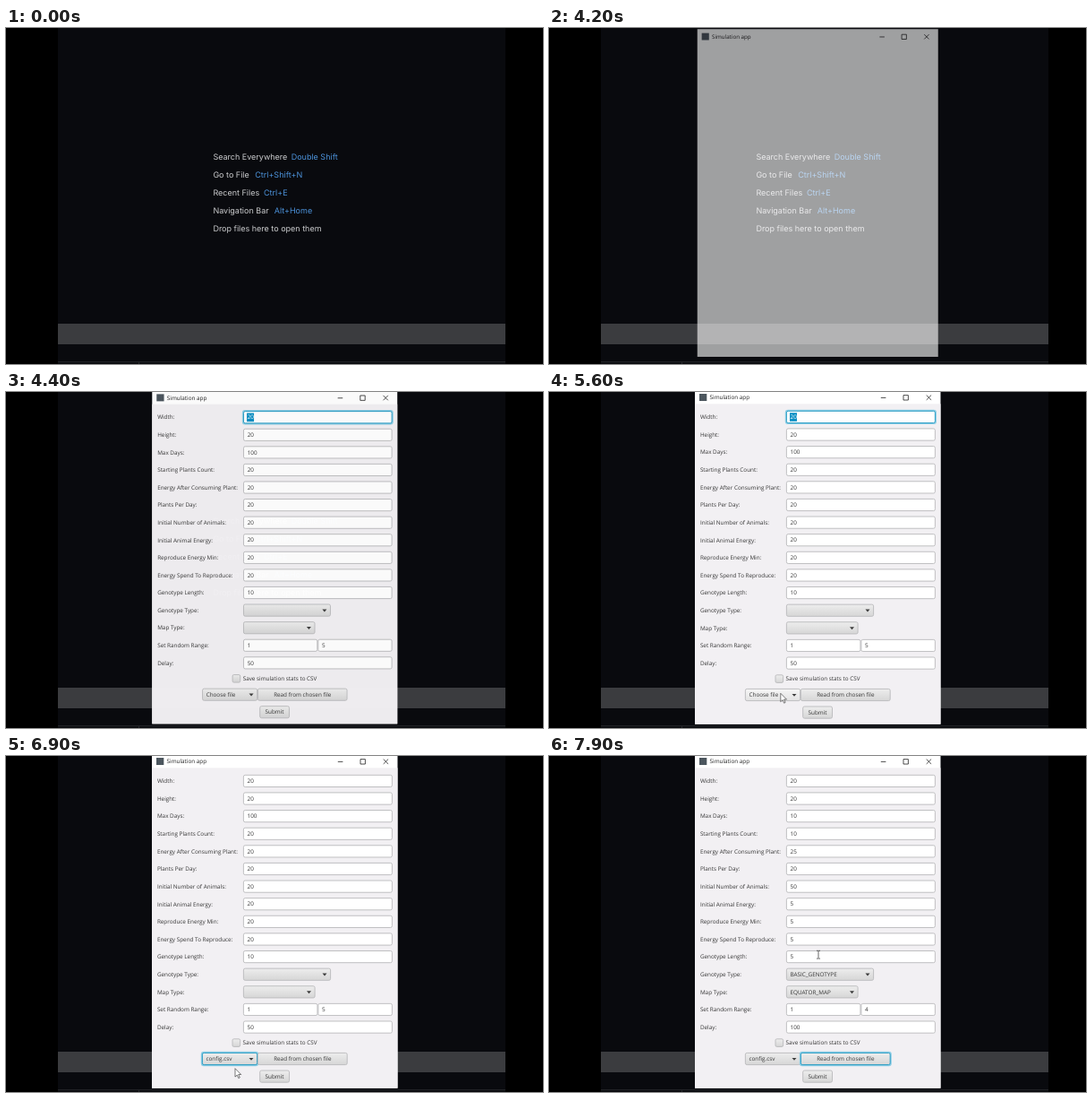
An HTML page that plays this animation: 600 px wide and 375 px high, repeating every 8 s.

```html
<!DOCTYPE html>
<html lang="en">
<head>
<meta charset="utf-8">
<title>Simulation app</title>
<style>
  html, body { margin: 0; width: 100%; height: 100%; overflow: hidden; background: #000; }
  svg { display: block; width: 100vw; height: 100vh; }
  text { text-rendering: geometricPrecision; white-space: pre; }
  .ide { font: 9px Inter, Roboto, sans-serif; fill: #cbccce; }
  .ide .key { fill: #4c92da; }
  .app { font: 6.35px "Open Sans", "Noto Sans", sans-serif; fill: #363636; }
</style>
</head>
<body>
<svg id="stage" viewBox="0 0 600 375" xmlns="http://www.w3.org/2000/svg">
  <defs>
    <linearGradient id="button" x2="0" y2="1">
      <stop offset="0" stop-color="#ededed"/>
      <stop offset="1" stop-color="#d6d6d6"/>
    </linearGradient>
    <linearGradient id="hover" x2="0" y2="1">
      <stop offset="0" stop-color="#f6f6f6"/>
      <stop offset="1" stop-color="#e2e2e2"/>
    </linearGradient>
  </defs>
  <rect width="600" height="375"/>
  <g id="desktop"></g>
  <g id="app"></g>
  <g id="pointer"></g>
</svg>
<script>
const LOOP = 8000, STEP = 100;
const OPEN = 4200, FORM = 4300, POINTER = 5100, COMBO_FOCUS = 6100, POPUP = 6200,
      PICK = 6800, READ_FOCUS = 7400, LOADED = 7600;

const labels = ['Width', 'Height', 'Max Days', 'Starting Plants Count', 'Energy After Consuming Plant',
  'Plants Per Day', 'Initial Number of Animals', 'Initial Animal Energy', 'Reproduce Energy Min',
  'Energy Spend To Reproduce', 'Genotype Length', 'Genotype Type', 'Map Type', 'Set Random Range', 'Delay'];
const defaults = [20, 20, 100, 20, 20, 20, 20, 20, 20, 20, 10, '', '', [1, 5], 50];
const loaded = [20, 20, 10, 10, 25, 20, 50, 5, 5, 5, 5, 'BASIC_GENOTYPE', 'EQUATOR_MAP', [1, 4], 100];

const byId = id => document.getElementById(id);
const rowY = i => 27.9 + 19.62 * i;
const lerp = (a, b, p) => a + (b - a) * p;
const progress = (t, from, to) => Math.min(1, Math.max(0, (t - from) / (to - from)));
const easeOut = p => 1 - (1 - p) ** 2;

const rect = (x, y, w, h, fill, extra = '') =>
  `<rect x="${x}" y="${y}" width="${w}" height="${h}" fill="${fill}" ${extra}/>`;
const text = (x, y, s, extra = '') => `<text x="${x}" y="${y}" ${extra}>${s}</text>`;
const path = (d, extra) => `<path d="${d}" ${extra}/>`;

// Rounded control centred vertically on cy
function box(x, cy, w, fill, focused) {
  const h = 14, y = cy - h / 2;
  const glow = focused
    ? rect(x - .4, y - .4, w + .8, h + .8, 'none', 'rx="2.2" stroke="#8fcfe6" stroke-width="1.6"') : '';
  const line = focused ? '#1795c0' : '#b9b9bb';
  return glow + rect(x + .4, y + .4, w - .8, h - .8, fill, `rx="1.8" stroke="${line}" stroke-width=".9"`);
}

function field(x, cy, w, value, focused) {
  const selection = focused ? rect(269, cy - 4.7, 8, 9.6, '#0a8fc4') : '';
  return box(x, cy, w, '#fff', focused) + selection +
    text(x + 4.6, cy + 2.2, value, focused ? 'fill="#fff"' : '');
}

function combo(x, cy, w, value, focused, hovered) {
  const ax = x + w - 9.5;
  return box(x, cy, w, hovered ? 'url(#hover)' : 'url(#button)', focused) +
    text(x + 4.5, cy + 2.2, value) +
    path(`M${ax} ${cy - 1.1}h5l-2.5 2.9z`, 'fill="#3c3c3c"');
}

function button(x, cy, w, label, focused, hovered) {
  return box(x, cy, w, hovered ? 'url(#hover)' : 'url(#button)', focused) +
    text(x + w / 2, cy + 2.2, label, 'text-anchor="middle"');
}

function desktop() {
  const hints = [
    ['Search Everywhere', 318.7, 'Double Shift'],
    ['Go to File', 278.2, 'Ctrl+Shift+N'],
    ['Recent Files', 288, 'Ctrl+E'],
    ['Navigation Bar', 299.7, 'Alt+Home'],
    ['Drop files here to open them', 0, '']
  ];
  return rect(58, 0, 500, 375, '#090a0e') +
    rect(58, 330, 500, 23, '#3b3c3f') +
    rect(58, 372.3, 500, .9, '#2b2d31') +
    rect(148, 373, .8, 2, '#2b2d31') +
    '<g class="ide">' + hints.map(([name, x, key], i) => {
      const y = 146.6 + 20.2 * i;
      return text(231.4, y, name) + text(x, y, key, 'class="key"');
    }).join('') + '</g>';
}

function titleBar() {
  const stroke = 'fill="none" stroke="#222" stroke-width=".8"';
  return rect(168, 2, 8.3, 8, '#4c565e') +
    text(179.6, 8.4, 'Simulation app', 'fill="#222"') +
    path('M370.8 6.4h5.6M396 3.6h5.4v5.4h-5.4zM421.7 3.5l5.4 5.4M427.1 3.5l-5.4 5.4', stroke);
}

function form(t, pos) {
  const values = t >= LOADED ? loaded : defaults;
  const over = (x, w) => pos && pos.y > 331 && pos.y < 345 && pos.x > x && pos.x < x + w;
  const rows = labels.map((label, i) => {
    const y = rowY(i), v = values[i];
    let control;
    if (i === 11) control = combo(265, y, 98, v);
    else if (i === 12) control = combo(265, y, 80.5, v);
    else if (i === 13) control = field(265, y, 83.3, v[0]) + field(348.5, y, 83.3, v[1]);
    else control = field(265, y, 166.8, v, i === 0 && t < COMBO_FOCUS);
    return text(168.9, y + 2.3, label + ':') + control;
  }).join('');
  const chosen = t >= PICK ? 'config.csv' : 'Choose file';
  const comboFocus = t >= COMBO_FOCUS && t < READ_FOCUS;
  return rows +
    rect(253, 315.8, 8.6, 8.6, 'url(#button)', 'rx="1.5" stroke="#b4b4b6" stroke-width=".8"') +
    text(264.6, 322.3, 'Save simulation stats to CSV') +
    combo(219, 338, 62, chosen, comboFocus, over(219, 62)) +
    button(281, 338, 100.6, 'Read from chosen file', t >= READ_FOCUS, over(281, 100.6)) +
    button(283.3, 357.6, 33.6, 'Submit') +
    (t >= POPUP && t < PICK ? popup(pos) : '');
}

function popup(pos) {
  const active = pos.y > 345;
  return rect(219, 345.5, 62, 17, '#fff', 'stroke="#bcbcbe" stroke-width=".8"') +
    (active ? rect(219.6, 347, 60.8, 14, '#0a8fc4') : '') +
    text(223.6, 356.3, 'config.csv', active ? 'fill="#fff"' : '');
}

function appWindow(t, pos) {
  if (t < OPEN) return '';
  const [scale, opacity] = t < 4300 ? [.98, .61] : t < 4400 ? [.993, .89] : t < 4500 ? [.998, .98] : [1, 1];
  const zoom = `translate(300.2 184.5) scale(${scale}) translate(-300.2 -184.5)`;
  const body = t < FORM ? '' : rect(163, 13.3, 274.5, 357.4, '#f2f0f3') + form(t, pos);
  return `<g class="app" transform="${zoom}" opacity="${opacity}">` +
    rect(163, -2.5, 274.5, 373.2, '#fff') + body + titleBar() + '</g>';
}

function pointerAt(t) {
  if (t < POINTER) return null;
  if (t >= 7900) return { x: 301, y: 221.5 };
  const legs = [
    [5100, 5600, 449, 21, 258.8, 336.3],
    [6300, 6600, 258.8, 336.3, 256, 348.7],
    [7000, 7300, 256, 348.7, 313, 339]
  ];
  const [from, to, x0, y0, x1, y1] = legs.filter(leg => t >= leg[0]).pop();
  const p = easeOut(progress(t, from, to));
  return { x: lerp(x0, x1, p), y: lerp(y0, y1, p) };
}

function overField({ x, y }) {
  return x > 265 && x < 431.8 &&
    labels.some((_, i) => i !== 11 && i !== 12 && Math.abs(y - rowY(i)) < 7);
}

function pointer(pos) {
  if (!pos) return '';
  const shape = overField(pos)
    ? path('M-2-4.2h1.4l.6.5.6-.5h1.4M0-3.7v7.8M-2 4.6h1.4l.6-.5.6.5h1.4',
        'fill="none" stroke="#333" stroke-width=".75"')
    : path('M0 0v9.4l2.2-2 1.6 3.5 1.5-.7-1.6-3.4h3z',
        'fill="#fff" stroke="#333" stroke-width=".65" stroke-linejoin="round"');
  return `<g transform="translate(${pos.x} ${pos.y})">${shape}</g>`;
}

function render(t) {
  const pos = pointerAt(t);
  byId('app').innerHTML = appWindow(t, pos);
  byId('pointer').innerHTML = pointer(pos);
}

byId('desktop').innerHTML = desktop();
const start = performance.now();
let shown = -1;
function tick() {
  const elapsed = (performance.now() - start) % LOOP;
  const t = Math.floor(elapsed / STEP) * STEP;
  if (t !== shown) render(shown = t);
  requestAnimationFrame(tick);
}
tick();
</script>
</body>
</html>
```
